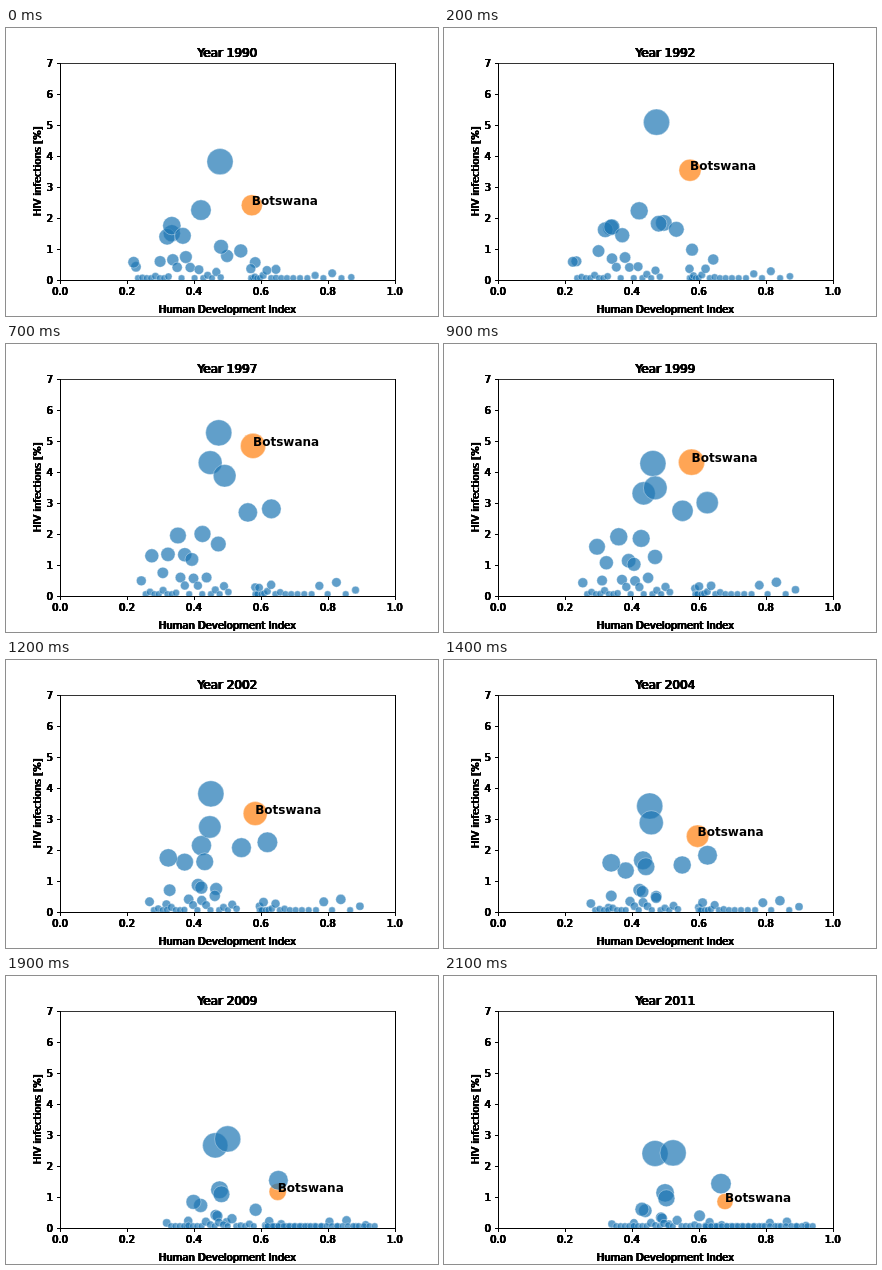
Recreate the animation shown at these times as an HTML page with a canvas. Size 432 by 288 pixels, loop 2200 ms.

```html
<!DOCTYPE html>
<html lang="en">
<head>
<meta charset="utf-8">
<title>HIV infections by Human Development Index</title>
<style>
html, body { margin: 0; width: 100%; height: 100%; overflow: hidden; background: #fff; }
canvas { display: block; }
</style>
</head>
<body>
<canvas id="stage" width="432" height="288"></canvas>
<script>
const ctx = document.getElementById('stage').getContext('2d');
const FIRST = 1990, MIDDLE = 2001, LAST = 2011, STEP = 100;
const LEFT = 54, RIGHT = 388.8, TOP = 34.56, BASE = 252;
const MAX_RATE = 7, MIN_RATE = 0.06, LATE_YEAR = 2009;
const BLUE = '#1f77b4', ORANGE = '#ff7f0e';

const xOf = hdi => LEFT + (RIGHT - LEFT) * hdi;
const yOf = rate => BASE - (BASE - TOP) * rate / MAX_RATE;
const mix = (a, b, k) => a + (b - a) * k;

function random(seed) {
  const n = Math.sin(seed * 12.9898) * 43758.5453;
  return n - Math.floor(n);
}

// A wave of infections climbs to its peak and dies away at its own pace
const wave = (peak, top, rise, fall) => year =>
  peak / Math.cosh((year - top) / (year < top ? rise : fall));

// The index eases from its start to a middle value and on to its end
const country = (start, middle, end, ...waves) => ({ start, middle, end, waves });

function hdiAt({ start, middle, end }, year) {
  return year < MIDDLE
    ? mix(start, middle, ((year - FIRST) / (MIDDLE - FIRST)) ** 1.5)
    : mix(middle, end, ((year - MIDDLE) / (LAST - MIDDLE)) ** 1.5);
}

const rateAt = ({ waves }, year) =>
  Math.max(MIN_RATE, waves.reduce((sum, w) => sum + w(year), 0));

// The first country is the highlighted one
const countries = [
  country(0.573, 0.58, 0.678, wave(4.95, 1995.6, 4.15, 6.3)),
  country(0.478, 0.42, 0.499, wave(5.35, 1993.3, 3.75, 5.1), wave(0.8, 2011, 5, 5)),
  country(0.499, 0.45, 0.469, wave(4.9, 1995.8, 2.2, 2.8), wave(2.9, 2003, 3, 12)),
  country(0.54, 0.445, 0.523, wave(3.4, 1996.9, 3.35, 3), wave(2.9, 2007, 4, 6)),
  country(0.645, 0.618, 0.666, wave(2.7, 1998, 2.6, 3.6), wave(1.3, 2010, 6, 6)),
  country(0.583, 0.54, 0.602, wave(2.8, 1998, 3.5, 4.9)),
  country(0.421, 0.43, 0.503, wave(2.25, 1990, 5, 14)),
  country(0.334, 0.37, 0.44, wave(1.95, 1997.5, 10, 7)),
  country(0.227, 0.32, 0.43, wave(1.75, 2001.5, 5.5, 5.5)),
  country(0.481, 0.465, 0.51, wave(2.1, 1993.5, 2.7, 5)),
  country(0.32, 0.325, 0.406, wave(1.65, 1993, 5, 6)),
  country(0.334, 0.41, 0.487, wave(1.75, 1990, 5, 9)),
  country(0.367, 0.42, 0.49, wave(1.45, 1991, 5, 9)),
  country(0.299, 0.315, 0.406, wave(1.05, 1993.5, 3, 4))
];

// Two crowds of lightly affected countries: low and high index
const CROWD = 21;
for (let i = 0; i < CROWD; i++) {
  const k = i / (CROWD - 1);
  const mild = (seed, limit) => wave(
    limit * random(seed) ** 3, FIRST + 12 * random(seed + 50), 6, 9);
  const low = mix(0.22, 0.48, k);
  const high = mix(0.57, 0.87, k * k);
  countries.push(
    country(low, low + 0.045, low + 0.12, mild(i + 1, 0.75)),
    country(high, high + 0.025, high + 0.05, mild(i + 101, 0.45))
  );
}

// These join near the end
const late = [];
for (let hdi = 0.62; hdi < 0.945; hdi += 0.016) late.push(country(hdi, hdi, hdi));

function drawBubbles(year) {
  const shown = year < LATE_YEAR ? countries : countries.concat(late);
  const rates = shown.map(c => rateAt(c, year));
  const peak = Math.max(...rates);
  ctx.save();
  ctx.beginPath();
  ctx.rect(LEFT, TOP, RIGHT - LEFT, BASE - TOP);
  ctx.clip();
  ctx.globalAlpha = 0.7;
  ctx.strokeStyle = '#fff';
  ctx.lineWidth = 0.5;
  shown.forEach((c, i) => {
    const share = (rates[i] - MIN_RATE) / (peak - MIN_RATE);
    ctx.fillStyle = i ? BLUE : ORANGE;
    ctx.beginPath();
    ctx.arc(xOf(hdiAt(c, year)), yOf(rates[i]), Math.sqrt(mix(11, 172, share)), 0, 2 * Math.PI);
    ctx.fill();
    ctx.stroke();
  });
  ctx.restore();
}

// Overprinted slightly apart, which thickens the strokes
function label(text, x, y, align, size = 10) {
  ctx.font = `${size}px "DejaVu Sans", sans-serif`;
  ctx.textAlign = align;
  for (const shift of [-0.4, 0.4]) {
    for (let i = 0; i < 3; i++) ctx.fillText(text, x + shift, y);
  }
}

function drawAxes() {
  const right = Math.round(RIGHT), top = Math.round(TOP);
  ctx.fillStyle = '#333';
  ctx.fillRect(LEFT, top, right - LEFT + 1, 1);
  ctx.fillStyle = '#000';
  ctx.fillRect(LEFT, top, 1, BASE - top + 1);
  ctx.fillRect(right, top, 1, BASE - top + 1);
  ctx.fillRect(LEFT, BASE, right - LEFT + 1, 1);
  for (let i = 0; i <= 5; i++) {
    const x = xOf(i / 5);
    ctx.fillRect(Math.round(x), BASE, 1, 4);
    label((i / 5).toFixed(1), x, 267, 'center');
  }
  for (let rate = 0; rate <= MAX_RATE; rate++) {
    const y = yOf(rate);
    ctx.fillRect(LEFT - 3, Math.round(y), 3, 1);
    label(rate, 47, y + 4, 'right');
  }
  label('Human Development Index', xOf(0.5), 285, 'center');
  ctx.save();
  ctx.translate(35, (TOP + BASE) / 2);
  ctx.rotate(-Math.PI / 2);
  label('HIV infections [%]', 0, 0, 'center');
  ctx.restore();
}

function draw(now) {
  const year = FIRST + Math.floor(now / STEP) % (LAST - FIRST + 1);
  const [marked] = countries;
  ctx.fillStyle = '#fff';
  ctx.fillRect(0, 0, 432, 288);
  drawBubbles(year);
  drawAxes();
  label('Year ' + year, xOf(0.5), 29, 'center', 12);
  ctx.font = 'bold 12px "DejaVu Sans", sans-serif';
  ctx.textAlign = 'left';
  ctx.fillText('Botswana', xOf(hdiAt(marked, year)), yOf(rateAt(marked, year)));
}

const start = performance.now();
function tick() {
  draw(performance.now() - start);
  requestAnimationFrame(tick);
}
tick();
</script>
</body>
</html>
```
